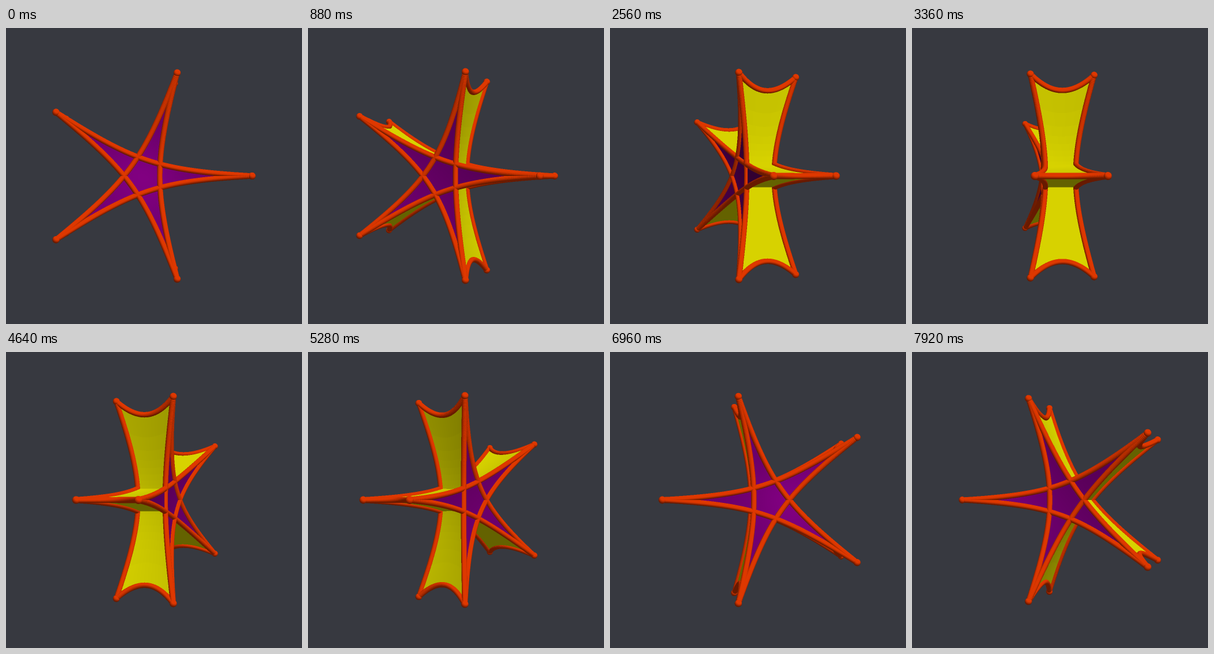
These frames come from a looping animation (512 by 512 pixels, 8 s). An HTML page with a canvas:

```html
<!DOCTYPE html>
<html>
<head>
<meta charset="utf-8">
<style>
html, body { margin: 0; height: 100%; overflow: hidden; background: #373940; }
canvas { display: block; width: 512px; height: 512px; }
</style>
</head>
<body>
<canvas id="stage" width="1024" height="1024"></canvas>
<script>
// Curved pentagrammic prism turning about its vertical axis, drawn with a depth buffer at 2x.
const SIZE = 1024, CAMERA = 983, RADIUS = 177.3, HALF = 0.3006, SHIFT = 0.0955;
const TUBE = 4.6, BALL = 5.9, STEP = 80, FRAMES = 100;
const AMBIENT = 100, FULL = 215, LIGHT = [40, 90, 115];
const ctx = document.getElementById("stage").getContext("2d");
const image = ctx.createImageData(SIZE, SIZE);
const pixels = new Uint32Array(image.data.buffer);
const depth = new Float32Array(SIZE * SIZE);

const rgb = (r, g, b) => (255 << 24 | b << 16 | g << 8 | r) >>> 0;
const BACK = rgb(55, 57, 64);
const dot = (a, b) => a[0] * b[0] + a[1] * b[1] + a[2] * b[2];
const sub = (a, b) => [a[0] - b[0], a[1] - b[1], a[2] - b[2]];
const mix = (a, b, t) => a.map((v, i) => v + (b[i] - v) * t);
const cross = (a, b) => [a[1] * b[2] - a[2] * b[1], a[2] * b[0] - a[0] * b[2], a[0] * b[1] - a[1] * b[0]];

// Pull straight lines and flat faces toward the centre; the corners stay put.
const CURVE = 0.893, PULL = 4.23;
function bend(p) {
  const q = dot(p, p) / (1 + HALF * HALF);
  const g = RADIUS * (1 + PULL * Math.sqrt(1 - CURVE)) / (1 + PULL * Math.sqrt(1 - CURVE * q));
  return [p[0] * g - SHIFT * RADIUS, p[1] * g, p[2] * g];
}

const polar = (r, deg, z) => {
  const a = deg * Math.PI / 180;
  return [r * Math.cos(a), r * Math.sin(a), z];
};

const dots = [], faces = [];

function addEdge(a, b, n) {
  for (let i = 0; i <= n; i++) dots.push({ p: bend(mix(a, b, i / n)), r: TUBE });
}

function addPatch(a, b, c, d, n, m, paint) {
  const at = (i, j) => bend(mix(mix(a, b, j / m), mix(d, c, j / m), i / n));
  for (let i = 0; i < n; i++)
    for (let j = 0; j < m; j++)
      faces.push({ quad: [at(i, j), at(i, j + 1), at(i + 1, j + 1), at(i + 1, j)], paint });
}

function shade(x, y, z) {
  const v = x * LIGHT[0] + y * LIGHT[1] + z * LIGHT[2];
  return Math.min(FULL, AMBIENT + Math.max(0, v));
}

function yellow(n) {
  const v = shade(...n);
  return rgb(v, v * 0.98, 0);
}

function purple(n) {
  const v = 0.5 * shade(...n) + 22 * Math.pow(Math.max(0, n[2]), 60);
  return rgb(v, 0, v);
}

function orange(x, y, z) {
  const v = shade(x, y, z) / FULL;
  return rgb(222 * v, 56 * v, 0);
}

for (let k = 0; k < 5; k++) {
  const a = 72 * k, b = a + 144;
  const [p, q, q2, p2] = [polar(1, a, HALF), polar(1, b, HALF), polar(1, b, -HALF), polar(1, a, -HALF)];
  addPatch(p, q, q2, p2, 64, 20, yellow);
  addEdge(p, p2, 120);
  for (const z of [HALF, -HALF]) {
    const tip = polar(1, a, z);
    addEdge(tip, polar(1, b, z), 600);
    dots.push({ p: bend(tip), r: BALL });
    for (const side of [-36, 36])
      addPatch([0, 0, z], [0, 0, z], polar(0.382, a + side, z), tip, 30, 12, purple);
  }
}

let cos = 1, sin = 0;
const turn = p => [p[0] * cos - p[2] * sin, p[1], p[0] * sin + p[2] * cos];

function project(p) {
  const s = CAMERA / (CAMERA - p[2]);
  return [SIZE / 2 + 2 * s * p[0], SIZE / 2 - 2 * s * p[1], p[2], s];
}

function triangle(a, b, c, color) {
  const area = (b[0] - a[0]) * (c[1] - a[1]) - (b[1] - a[1]) * (c[0] - a[0]);
  if (Math.abs(area) < 1e-6) return;
  const x0 = Math.ceil(Math.min(a[0], b[0], c[0]) - 0.5), x1 = Math.max(a[0], b[0], c[0]) - 0.5;
  const y0 = Math.ceil(Math.min(a[1], b[1], c[1]) - 0.5), y1 = Math.max(a[1], b[1], c[1]) - 0.5;
  for (let y = y0; y <= y1; y++)
    for (let x = x0; x <= x1; x++) {
      const dx = x + 0.5 - a[0], dy = y + 0.5 - a[1];
      const u = (dx * (c[1] - a[1]) - dy * (c[0] - a[0])) / area;
      const v = (dy * (b[0] - a[0]) - dx * (b[1] - a[1])) / area;
      if (u < -1e-6 || v < -1e-6 || u + v > 1 + 1e-6) continue;
      const z = a[2] + u * (b[2] - a[2]) + v * (c[2] - a[2]), i = y * SIZE + x;
      if (z > depth[i]) { depth[i] = z; pixels[i] = color; }
    }
}

function drawFace({ quad, paint }) {
  const w = quad.map(turn);
  const n = cross(sub(w[2], w[0]), sub(w[3], w[1]));
  const flip = dot(n, sub([0, 0, CAMERA], w[0])) < 0 ? -1 : 1;
  const len = flip * Math.hypot(...n) || 1;
  const color = paint(n.map(v => v / len));
  const [a, b, c, d] = w.map(project);
  triangle(a, b, c, color);
  triangle(a, c, d, color);
}

function drawDot({ p, r }) {
  const [cx, cy, cz, s] = project(turn(p)), R = 2 * r * s;
  for (let y = Math.ceil(cy - R - 0.5); y <= cy + R - 0.5; y++)
    for (let x = Math.ceil(cx - R - 0.5); x <= cx + R - 0.5; x++) {
      const nx = (x + 0.5 - cx) / R, ny = (cy - y - 0.5) / R, h = 1 - nx * nx - ny * ny;
      if (h < 0) continue;
      const nz = Math.sqrt(h), z = cz + r * nz, i = y * SIZE + x;
      if (z > depth[i]) { depth[i] = z; pixels[i] = orange(nx, ny, nz); }
    }
}

function render(frame) {
  const angle = frame * 2 * Math.PI / 180;
  cos = Math.cos(angle);
  sin = Math.sin(angle);
  pixels.fill(BACK);
  depth.fill(-1e9);
  faces.forEach(drawFace);
  dots.forEach(drawDot);
  ctx.putImageData(image, 0, 0);
}

let shown = -1;
function tick() {
  const frame = Math.floor(performance.now() / STEP) % FRAMES;
  if (frame !== shown) render(shown = frame);
  requestAnimationFrame(tick);
}
tick();
</script>
</body>
</html>
```
